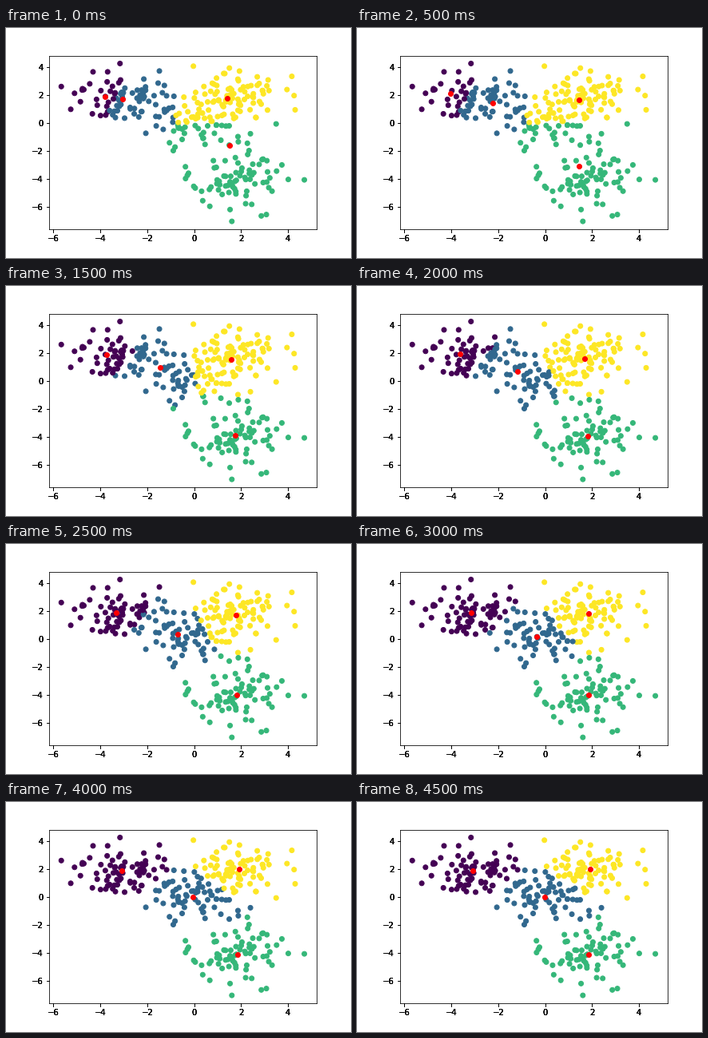
These frames come from a looping animation (432x288 px, 5000 ms). A matplotlib script:

```python
import numpy as np
import matplotlib.pyplot as plt
from matplotlib.animation import FuncAnimation

STEPS = 10
BLOBS = [(0, 0), (2, 2), (-3, 2), (2, -4)]
STARTS = [(-3.81, 1.87), (-3.06, 1.71), (1.52, -1.60), (1.41, 1.77)]


def make_points(per_blob=75):
    rng = np.random.RandomState(0)
    pts = np.concatenate([rng.normal(c, 1.0, (per_blob, 2)) for c in BLOBS])
    order = np.arange(len(pts))
    rng.shuffle(order)
    return pts[order]


def nearest(a, b):
    """Index of the row of b closest to each row of a."""
    return np.linalg.norm(a[:, None] - b[None], axis=2).argmin(axis=1)


def lloyd(pts, centers):
    """List of (labels, centers), beginning with the starting centers."""
    labels = nearest(pts, centers)
    states = [(labels, centers)]
    while len(states) < STEPS:
        centers = np.array([pts[labels == k].mean(axis=0)
                            for k in range(len(centers))])
        states.append((labels, centers))
        labels = nearest(pts, centers)
    return states


points = make_points()
states = lloyd(points, points[nearest(np.array(STARTS), points)])

fig, ax = plt.subplots(figsize=(6, 4), dpi=72, facecolor="white")
fig.subplots_adjust(left=0.125, right=0.9, bottom=0.125, top=0.88)
dots = ax.scatter(*points.T, c=states[0][0], cmap="viridis", vmin=0, vmax=3)
marks = ax.scatter(*states[0][1].T, c="r")
xlim, ylim = ax.get_xlim(), ax.get_ylim()

# Repeated axes harden the edges of ticks and labels
for i in range(3):
    fig.add_axes(ax.get_position(), frameon=False, xlim=xlim, ylim=ylim,
                 label=f"ticks{i}")


def draw(i):
    labels, centers = states[i]
    dots.set_array(labels)
    marks.set_offsets(centers)
    return dots, marks


anim = FuncAnimation(fig, draw, frames=STEPS, interval=500, repeat=True)
plt.show()
```
